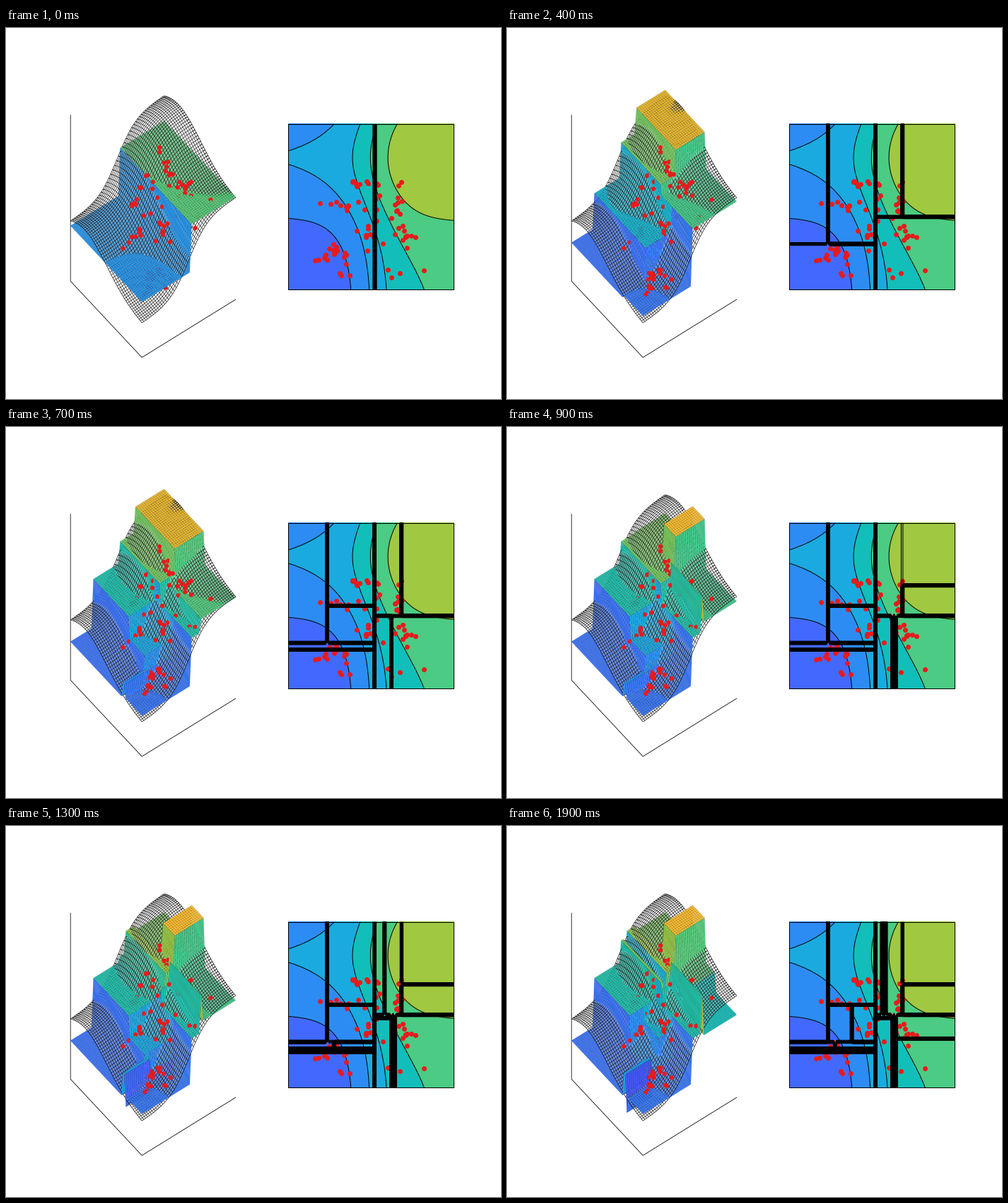
Write a matplotlib script that moves like this. It is 700x525 px and loops after 2000 ms.

```python
import numpy as np
import matplotlib.pyplot as plt
from matplotlib.animation import FuncAnimation
from matplotlib.collections import PolyCollection
from matplotlib.colors import LinearSegmentedColormap, to_rgba

W, H, DPI = 700, 525, 100
PX = 72 / DPI                      # one pixel in points
N = 50                             # grid nodes per side
STEPS = 20
RED = "#e81a1c"
LEFT, BOTTOM, SIDE = 399.1, 370.1, 234.3   # the map on the right

# Evenly spaced from height .1 to height .9
ramp = LinearSegmentedColormap.from_list("heat", [
    "#4742e4", "#4269fe", "#2d8cf3", "#1baadf", "#12beb9",
    "#4acb84", "#a0c841", "#e8b82c", "#fec03a"], N=512)

# Sample clusters in stage pixels: centre, spread, size
CLUSTERS = [(495, 220, 10, 3, 6), (556, 221, 24, 3, 6), (482, 252, 15, 7, 9),
            (517, 256, 8, 12, 5), (553, 252, 5, 10, 8), (515, 297, 14, 12, 10),
            (565, 289, 12, 10, 12), (465, 322, 13, 8, 18), (478, 350, 8, 8, 3),
            (563, 350, 17, 10, 4)]

# Tree growth: leaf to split, axis, first node of the high side,
# value of the low side, value of the high side (which becomes a new leaf)
SPLITS = [(0, "x", 26, .334, .617), (0, "y", 14, .250, .425),
          (1, "y", 22, .590, .686), (2, "x", 12, .232, .443),
          (3, "x", 34, .650, .802), (4, "y", 25, .390, .523),
          (1, "x", 31, .530, .608), (0, "y", 12, .245, .320),
          (7, "x", 32, .745, .585), (5, "y", 31, .875, .656),
          (3, "x", 29, .555, .686), (0, "y", 11, .250, .190),
          (8, "x", 14, .375, .290), (1, "y", 21, .520, .620),
          (3, "x", 28, .650, .440), (9, "y", 15, .498, .614),
          (12, "x", 14, .155, .220), (4, "x", 19, .310, .440)]


def heat(w):
    return ramp((np.asarray(w) - .1) / .8)


def surface(u, v):
    """A smooth step along u plus a ridge across v."""
    step = .41 / (1 + np.exp(-10 * (u - .5)))
    ridge = .2 * np.exp(-(v - .797) ** 2 / .19)
    return .199 + step + ridge


def project(u, v, w):
    x = 192.2 + 132.5 * u - 101 * v
    y = 466.2 - 82 * u - 108 * v - 235 * w
    return np.stack([x, y], axis=-1)


def split_count(n):
    """One split per step, slowing to every second step near the end."""
    return n + 1 if n < 16 else 16 + (n - 15) // 2


def tree(count):
    """Piecewise constant heights after the first `count` splits."""
    z = np.zeros((N, N))
    leaves = [(0, N, 0, N)]
    for leaf, axis, cut, low, high in SPLITS[:count]:
        i0, i1, j0, j1 = leaves[leaf]
        if axis == "x":
            a, b = (i0, cut, j0, j1), (cut, i1, j0, j1)
        else:
            a, b = (i0, i1, j0, cut), (i0, i1, cut, j1)
        leaves[leaf] = a
        leaves.append(b)
        for (p, q, r, s), value in ((a, low), (b, high)):
            z[r:s, p:q] = value
    return z


def quads(z):
    """Closed cell outlines, starting at the corner (i + 1, j)."""
    p = project(U, V, z)
    a, b, c, d = p[:-1, 1:], p[:-1, :-1], p[1:, :-1], p[1:, 1:]
    return np.stack([a, b, c, d, a], axis=2).reshape(-1, 5, 2)


def cell_mean(z):
    return ((z[:-1, 1:] + z[:-1, :-1] + z[1:, :-1] + z[1:, 1:]) / 4).ravel()


t = np.linspace(0, 1, N)
U, V = np.meshgrid(t, t)
F = surface(U, V)
MX, MY = LEFT + SIDE * U, BOTTOM - SIDE * V

cj, ci = (k.ravel() for k in np.mgrid[0:N - 1, 0:N - 1])
depth = -10.0 * (ci + cj)          # larger means nearer to the viewer

# Wire mesh: faint panes, two edges per cell, full outlines at the far borders
panes = list(quads(F))
far = (ci == N - 2) | (cj == N - 2)
wire = [q if full else q[:3] for q, full in zip(panes, far)]
wire_key = depth + cell_mean(F)

rng = np.random.default_rng(7)
pts = np.concatenate([rng.normal((x, y), (sx, sy), (n, 2))
                      for x, y, sx, sy, n in CLUSTERS])
pu, pv = (pts[:, 0] - LEFT) / SIDE, (BOTTOM - pts[:, 1]) / SIDE
pw = surface(pu, pv)
ang = np.linspace(0, 2 * np.pi, 17)
disc = 3.2 * np.stack([np.cos(ang), np.sin(ang)], axis=1)
dots = [c + disc for c in project(pu, pv, pw)]
# Pulled two cells forward so that the wire does not cut the discs
dot_key = -10.0 * (np.floor(pu * (N - 1)) + np.floor(pv * (N - 1)) - 2) + pw

fig = plt.figure(figsize=(W / DPI, H / DPI), dpi=DPI, facecolor="white")
ax = fig.add_axes([0, 0, 1, 1])
ax.set_xlim(0, W)
ax.set_ylim(H, 0)
ax.axis("off")

bands = np.arange(2, 8) / 10
ax.contourf(MX, MY, F, levels=bands, colors=list(heat(bands)), extend="max")
ax.contour(MX, MY, F, levels=bands[1:], colors="k", linewidths=PX)
ax.plot(pts[:, 0], pts[:, 1], "o", ms=7 * PX, mfc=RED, mec="none", zorder=3)
ax.add_patch(plt.Rectangle((LEFT, BOTTOM), SIDE, -SIDE, fill=False, ec="k",
                           lw=PX, zorder=6))
corners = project(np.array([0, 0, 0, 1]), np.array([1, 1, 0, 0]),
                  np.array([1, 0, 0, 0]))
ax.plot(*corners.T, "k", lw=.8 * PX, zorder=1)

# Drawing styles in the order: tree faces, panes, wire, dots
counts = [len(panes)] * 3 + [len(dots)]
styles = [((0, 0, 0, .2), .5), ((0, 0, 0, 0), 0),
          ((0, 0, 0, 1), .65), ((0, 0, 0, 0), 0)]
edge = np.repeat([c for c, _ in styles], counts, axis=0)
width = np.repeat([w * PX for _, w in styles], counts)
face = np.repeat([(0, 0, 0, 0), (1, 1, 1, .2), (0, 0, 0, 0), to_rgba(RED)],
                 counts, axis=0)

scene = PolyCollection([], closed=False, zorder=2)
ax.add_collection(scene, autolim=False)
bars = []


def update(n):
    while bars:
        bars.pop().remove()
    z = tree(split_count(n))

    # Draw back to front; inside one cell the higher part comes last
    key = np.concatenate([depth + cell_mean(z), wire_key, wire_key, dot_key])
    order = np.argsort(key, kind="stable")
    shapes = list(quads(z)) + panes + wire + dots
    face[:len(panes)] = heat(z[:-1, :-1].ravel())
    scene.set_verts([shapes[k] for k in order], closed=False)
    scene.set_facecolor(face[order])
    scene.set_edgecolor(edge[order])
    scene.set_linewidth(width[order])

    # Dense level lines merge into black bars at the steps of the tree
    levels = np.arange(z.min() + .0017, z.max(), .003)
    bars.append(ax.contour(MX, MY, z, levels=levels, colors="k",
                           linewidths=1.1 * PX, zorder=5))
    return [scene]


def start():
    return [scene]


anim = FuncAnimation(fig, update, frames=STEPS, init_func=start,
                     interval=100, repeat=True, repeat_delay=0, blit=False)
plt.show()
```
